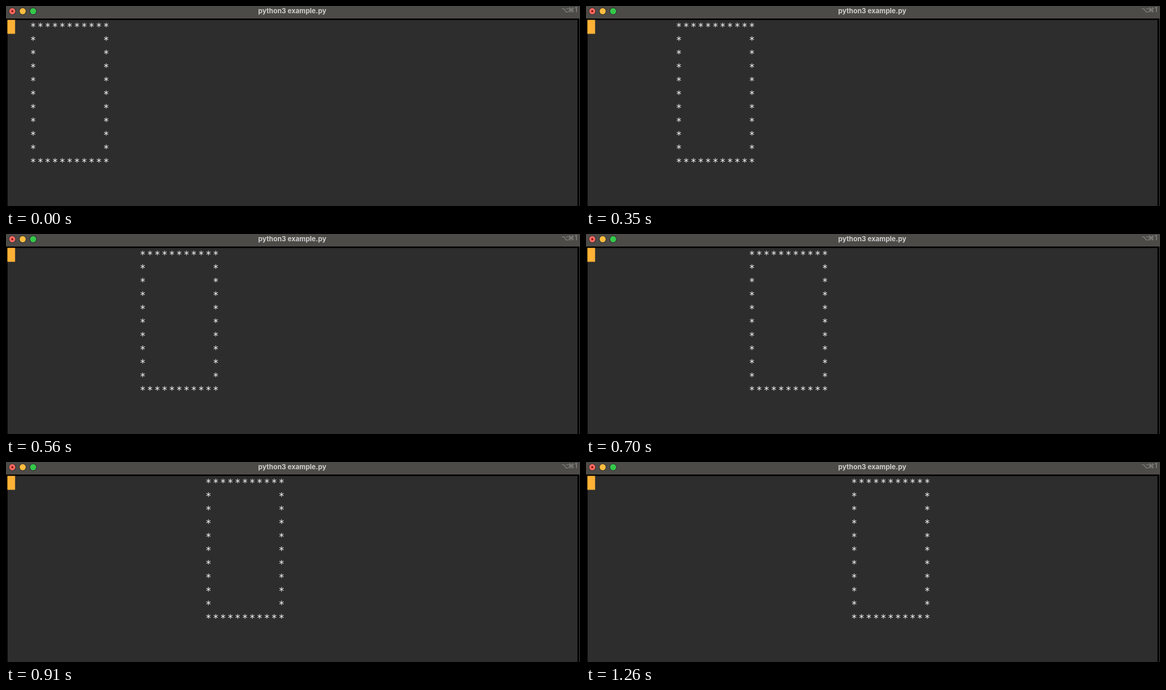
Recreate the animation shown at these times as an HTML page with a canvas. Size 1100 by 384 pixels, loop 1.33 s.

```html
<!DOCTYPE html>
<html lang="en">
<head>
<meta charset="utf-8">
<title>python3 example.py</title>
<style>
  html, body { margin: 0; width: 100%; height: 100%; overflow: hidden; background: #000; }
  canvas { display: block; }
</style>
</head>
<body>
<canvas id="stage" width="1100" height="384"></canvas>
<script>
const ctx = document.getElementById('stage').getContext('2d');
const STEP = 70, STEPS = 19;
const CELL = 14, LINE = 26, SIDE = 11;
const LEFT = 52, BASELINE = 46;

function rect(color, x, y, w, h) {
  ctx.fillStyle = color;
  ctx.fillRect(x, y, w, h);
}

function disc(color, x, y, r) {
  ctx.fillStyle = color;
  ctx.beginPath();
  ctx.arc(x, y, r, 0, Math.PI * 2);
  ctx.fill();
}

function write(text, font, color, x, y) {
  ctx.font = font;
  ctx.fillStyle = color;
  ctx.fillText(text, x, y);
}

function drawTitleBar() {
  rect('#4c4b48', 0, 0, 1100, 24);
  ['#ff6a62', '#fdbd3f', '#34c84a'].forEach((color, i) => {
    const x = 12 + i * 20;
    disc('#2c2c2a', x, 10, 7);
    disc(color, x, 10, 5.9);
  });
  disc('#860b08', 12, 10, 1.9);

  write('python3 example.py', '700 13px Inter, sans-serif', '#cfcecc', 548.5, 14);
  const keys = '12px "DejaVu Sans", sans-serif';
  write('⌥', keys, '#979694', 1071.5, 12);
  write('⌘', keys, '#979694', 1083, 12);
  write('1', '13px Inter, sans-serif', '#979694', 1092.5, 12);
}

function drawSquare(shift) {
  const font = '19px "DejaVu Sans Mono", monospace';
  const last = SIDE - 1;
  for (let row = 0; row < SIDE; row++) {
    const gap = row % last === 0 ? 1 : last;
    for (let col = 0; col < SIDE; col += gap) {
      write('*', font, '#fafafa', LEFT + (col + shift) * CELL, BASELINE + row * LINE);
    }
  }
}

function draw(now) {
  const step = Math.floor(now / STEP) % STEPS;
  rect('#000', 0, 0, 1100, 384);
  drawTitleBar();
  rect('#4a4a4a', 1099, 24, 1, 360);
  rect('#2d2d2d', 3, 27, 1092, 357);
  // The cursor bleeds slightly past its cell.
  rect('#ffb236', 2.6, 26.6, CELL + 0.8, LINE + 0.8);
  // The square advances 11 cells every 6 steps.
  drawSquare(Math.floor(step * 11 / 6 + 0.7));
}

let start;
function tick(now) {
  start ??= now;
  draw(now - start);
  requestAnimationFrame(tick);
}
ctx.textAlign = 'center';
requestAnimationFrame(tick);
</script>
</body>
</html>
```
